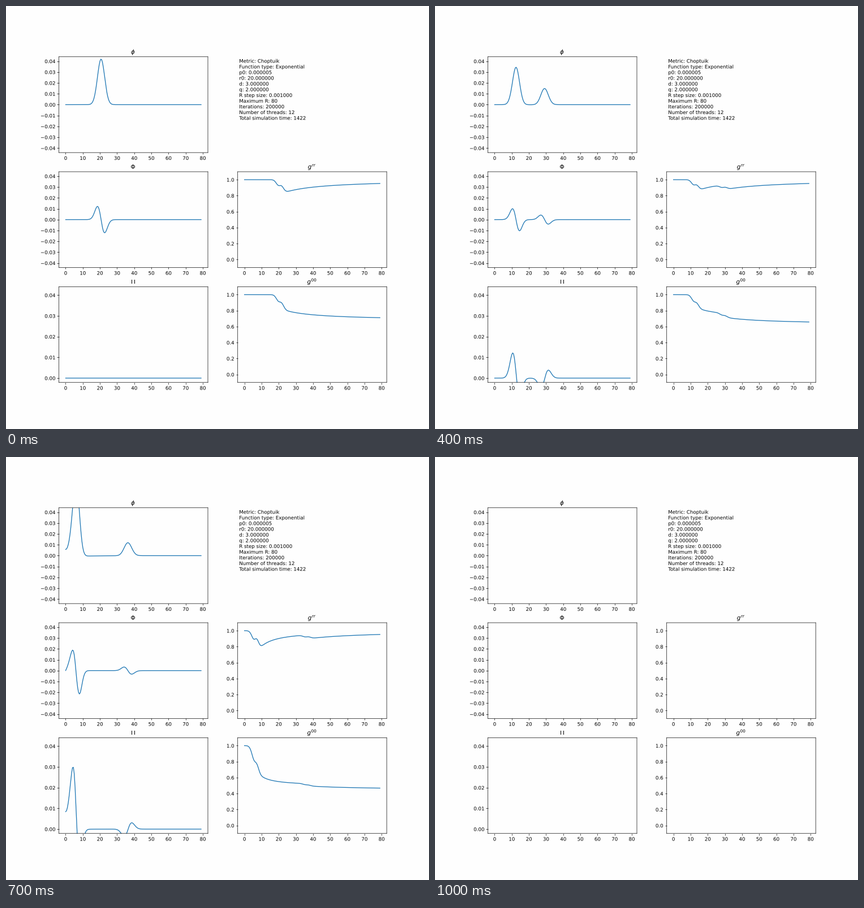
These frames come from a looping animation (748 by 748 pixels, 2000 ms). A matplotlib script:

```python
import numpy as np
import matplotlib.pyplot as plt
from matplotlib.animation import FuncAnimation
from matplotlib.patheffects import Normal

# Subpixel placement: no snapping, and text drawn as outlines.
plt.rcParams.update({
    "path.snap": False,
    "path.effects": [Normal()],
    "text.hinting": "none",
    "figure.facecolor": "#fefefe",
    "axes.facecolor": "#fefefe",
})

SIZE = 748
P0, R0, D, Q = 5e-6, 20.0, 3.0, 2
R_MAX, DR = 80, 0.04
STATES, DT_STATE = 10, 2.0
FRAMES, INTERVAL = 20, 100
MAX_STEPS = 3000

r = (np.arange(int(R_MAX / DR)) + 0.5) * DR
r2, r3 = r**2, r**3
xs = np.arange(0, 79.01, 0.5)


def integrate(f):
    """Running integral from the origin on the staggered grid."""
    out = np.empty_like(f)
    out[0] = f[0] * DR / 4
    out[1:] = out[0] + np.cumsum(f[1:] + f[:-1]) * DR / 2
    return out


def metric(Phi, Pi):
    """Return g^rr = 1/a^2 and ln(alpha), with alpha = 1 at the centre."""
    s = 2 * np.pi * r * (Phi**2 + Pi**2)
    growth = np.exp(2 * integrate(s))
    mass = integrate(r * s * growth) / growth
    grr = 1 - 2 * mass / r
    return grr, integrate(mass / (r2 * grr) + s)


def rates(u):
    Phi, Pi = u
    grr, log_alpha = metric(Phi, Pi)
    speed = np.exp(log_alpha) * np.sqrt(grr)
    x, y = speed * Pi, r2 * speed * Phi
    du = np.zeros_like(u)
    du[0, 1:-1] = (x[2:] - x[:-2]) / (2 * DR)
    du[0, 0] = (x[1] - x[0]) / (2 * DR)
    du[1, 1:-1] = 3 * (y[2:] - y[:-2]) / (r3[2:] - r3[:-2])
    du[1, 0] = 3 * (y[1] + y[0]) / (r3[1] + r3[0])
    return du, speed.max()


def advance(u, span):
    """Runge-Kutta steps with a little high-frequency damping."""
    t = 0.0
    for _ in range(MAX_STEPS):
        k1, speed = rates(u)
        dt = min(0.02, 0.8 * DR / speed, span - t)
        k2 = rates(u + dt / 2 * k1)[0]
        k3 = rates(u + dt / 2 * k2)[0]
        k4 = rates(u + dt * k3)[0]
        new = u + dt / 6 * (k1 + 2 * k2 + 2 * k3 + k4)
        new[:, 2:-2] -= 0.01 * np.diff(new, 4, axis=1)
        if not np.isfinite(new).all():
            break
        u = new
        t += dt
        if t >= span - 1e-9:
            break
    return u


def curves(u):
    Phi, Pi = u
    phi = integrate(Phi)
    grr, log_alpha = metric(Phi, Pi)
    fields = (phi - phi[-1], Phi, Pi, grr, np.exp(-2 * log_alpha))
    return [np.interp(xs, r, f) for f in fields]


def simulate():
    bell = P0 * np.exp(-(((r - R0) / D) ** Q))
    u = np.array([bell * (3 * r2 - r3 * Q * (r - R0) / D**2), np.zeros_like(r)])
    states = [curves(u)]
    for _ in range(STATES - 1):
        u = advance(u, DT_STATE)
        states.append(curves(u))
    return states


with np.errstate(all="ignore"):
    states = simulate()

fig, axes = plt.subplots(3, 2, figsize=(12, 12), dpi=SIZE / 12)
axes[0, 1].axis("off")

peak = 0.042
wave = (-1.05 * peak, 1.05 * peak), np.arange(-4, 5) / 100
half = (-0.05 * peak, 1.05 * peak), np.arange(5) / 100
unit = (-0.1, 1.1), np.arange(6) / 5
panels = [
    (axes[0, 0], r"$\phi$", wave),
    (axes[1, 0], r"$\Phi$", wave),
    (axes[2, 0], r"$\Pi$", half),
    (axes[1, 1], "$g^{rr}$", unit),
    (axes[2, 1], "$g^{00}$", unit),
]
lines = []
for ax, title, (ylim, ticks) in panels:
    ax.set_title(title)
    ax.set_xticks(np.arange(0, 81, 10))
    ax.set_yticks(ticks)
    ax.set_xlim(-0.05 * 79, 1.05 * 79)
    ax.set_ylim(*ylim)
    lines += ax.plot([], [], color="C0")

info = [
    "Metric: Choptuik",
    "Function type: Exponential",
    f"p0: {P0:.6f}",
    f"r0: {R0:.6f}",
    f"d: {D:.6f}",
    f"q: {Q:.6f}",
    "R step size: 0.001000",
    f"Maximum R: {R_MAX}",
    "Iterations: 200000",
    "Number of threads: 12",
    "Total simulation time: 1422",
]
for i, row in enumerate(info):
    fig.text(412.3 / SIZE, 1 - (100.3 + 10.09 * i) / SIZE, row, fontsize=10)


def draw(i):
    for k, line in enumerate(lines):
        if i < STATES:
            line.set_data(xs, states[i][k])
        else:
            line.set_data([], [])
    return lines


anim = FuncAnimation(fig, draw, frames=FRAMES, interval=INTERVAL,
                     init_func=lambda: draw(0), repeat=True, repeat_delay=0)
plt.show()
```
